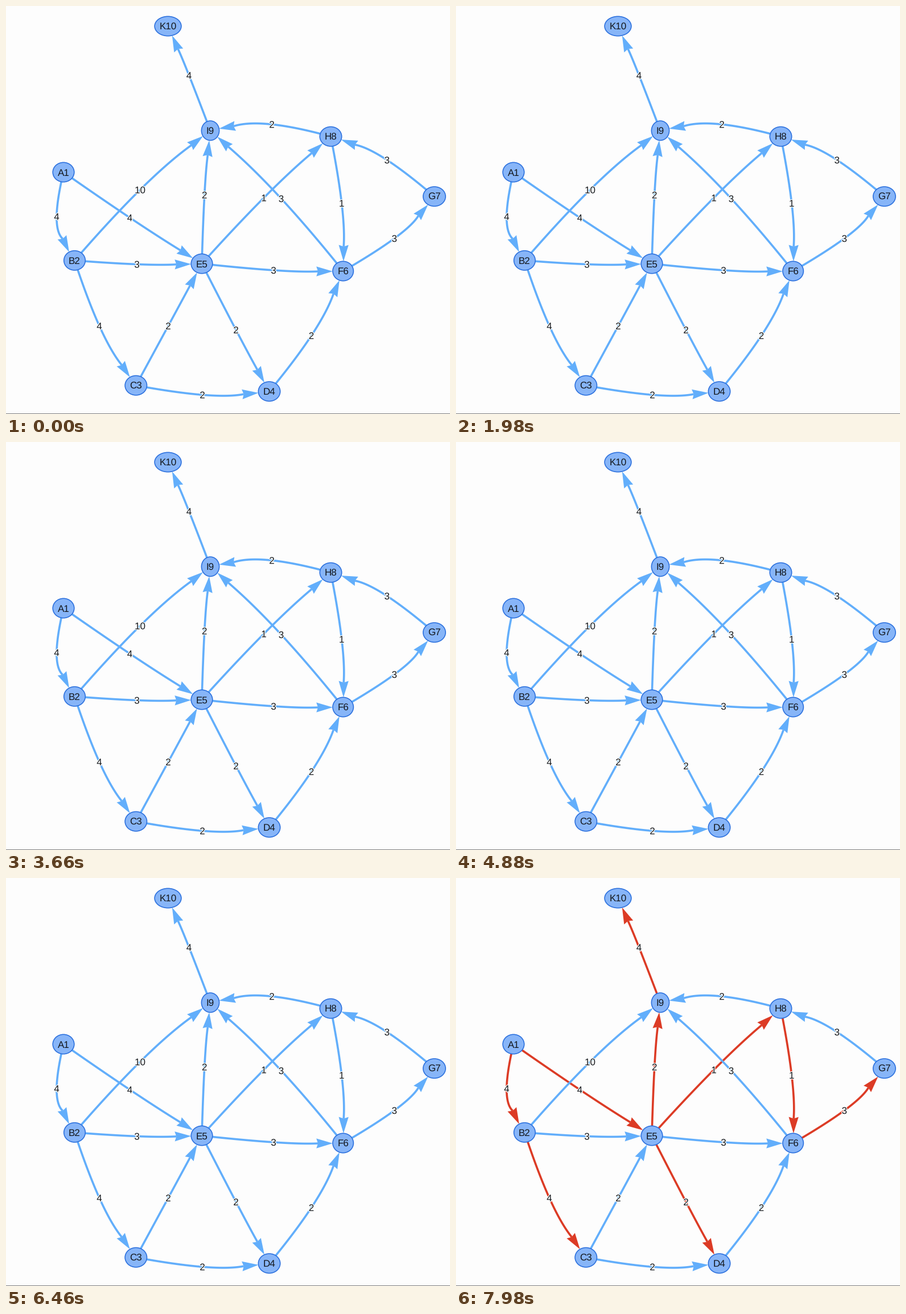
A matplotlib script that plays this animation: 780x718 px, repeating every 8 s.

```python
import numpy as np
import matplotlib.pyplot as plt
from matplotlib.animation import FuncAnimation
from matplotlib.patches import Ellipse, Polygon, Rectangle
from matplotlib.patheffects import withStroke

plt.rcParams["text.hinting"] = "none"

W, H, DPI = 780, 718, 100
PT = 72 / DPI                    # points per pixel
LOOP, STEP, REVEAL = 8000, 80, 6560   # ms

BACK, INK = "#fdfdfd", "#14171b"
FILL, BORDER = "#87b5f8", "#2b70de"
BLUE, RED = "#62aefb", "#dc3b25"
FONT, LINE, ARROW = 17, 3.6, 28.8
RY = 17.2

# name: centre x, centre y, half width
NODES = {
    "A1": (101, 292.5, 18.8), "B2": (120.5, 447.8, 18.8),
    "C3": (228.3, 667.7, 19.2), "D4": (462.5, 678.3, 19.2),
    "E5": (344, 453.5, 18.8), "F6": (592.2, 466.5, 18.2),
    "G7": (752.5, 335.2, 19.7), "H8": (570.5, 229.7, 19.2),
    "I9": (359, 219.3, 15.6), "K10": (284.5, 35.5, 23.4),
}

# start, end, weight, label position (middle of the line), on a shortest path
EDGES = [
    ("A1", "B2", 4, (89, 370.5), True),
    ("A1", "E5", 4, (217.5, 372.5), True),
    ("B2", "C3", 4, (164, 563), True),
    ("B2", "E5", 3, (230, 454.5), False),
    ("B2", "I9", 10, (235.5, 323.5), False),
    ("C3", "D4", 2, (345, 684.3), False),
    ("C3", "E5", 2, (285, 563), False),
    ("D4", "F6", 2, (536.5, 580), False),
    ("E5", "D4", 2, (404, 570), True),
    ("E5", "F6", 3, (470, 465), False),
    ("E5", "H8", 1, (453, 337.5), True),
    ("E5", "I9", 2, (348.7, 332.5), True),
    ("F6", "G7", 3, (682.3, 409), True),
    ("F6", "I9", 3, (483.5, 339), False),
    ("G7", "H8", 3, (669.3, 271), False),
    ("H8", "F6", 1, (589.7, 347), True),
    ("H8", "I9", 2, (467, 208.3), False),
    ("I9", "K10", 4, (321.5, 122), True),
]

fig = plt.figure(figsize=(W / DPI, H / DPI), dpi=DPI, facecolor=BACK)
ax = fig.add_axes([0, 0, 1, 1])
ax.set_xlim(0, W)
ax.set_ylim(H, 0)
ax.axis("off")


def bezier(a, c, b, t):
    t = np.asarray(t, float)[..., None]
    return (1 - t) ** 2 * a + 2 * t * (1 - t) * c + t ** 2 * b


def border_time(a, c, b, rx):
    """Curve parameter at which the edge enters its end node."""
    lo, hi = 0.5, 1.0
    for _ in range(30):
        mid = (lo + hi) / 2
        dx, dy = bezier(a, c, b, mid) - b
        if (dx / rx) ** 2 + (dy / RY) ** 2 > 1:
            lo = mid
        else:
            hi = mid
    return lo


def arrow_tip(a, c, b, rx):
    """Tip and direction of the arrow head at the end node."""
    t = border_time(a, c, b, rx)
    tip = bezier(a, c, b, t)
    d = tip - bezier(a, c, b, t - 0.1)
    return tip, d / np.hypot(*d)


def label(x, y, text, z, **kw):
    ax.text(x, y + 0.355 * FONT, text, ha="center", va="baseline", color=INK,
            family="Liberation Sans", size=FONT * PT, zorder=z, **kw)


def add_edge(start, end, weight, mid):
    a = np.array(NODES[start][:2])
    b = np.array(NODES[end][:2])
    mid = np.array(mid)
    # The line stops inside the arrow head; settle the bend so that
    # its middle falls on the label.
    core = b
    for _ in range(20):
        via = 2 * mid - (a + core) / 2
        tip, d = arrow_tip(a, via, b, NODES[end][2])
        core = tip - 0.9 * ARROW * d
    pts = bezier(a, via, core, np.linspace(0, 1, 60))
    line, = ax.plot(*pts.T, color=BLUE, lw=LINE * PT, zorder=1,
                    solid_capstyle="butt")
    back = tip - ARROW * d
    side = 0.3 * ARROW * np.array([-d[1], d[0]])
    head = Polygon([tip, back + side, core, back - side], fc=BLUE, lw=0,
                   zorder=3)
    ax.add_patch(head)
    label(*mid, str(weight), 2,
          path_effects=[withStroke(linewidth=2.6 * PT, foreground="white")])
    return line, head


path = []
for start, end, weight, mid, shortest in EDGES:
    parts = add_edge(start, end, weight, mid)
    if shortest:
        path.extend(parts)

for name, (x, y, rx) in NODES.items():
    ax.add_patch(Ellipse((x, y), 2 * rx, 2 * RY, fc=FILL, ec=BORDER,
                         lw=1.6 * PT, zorder=4))
    label(x, y, name, 5)

ax.add_patch(Rectangle((0, H - 1), W, 1, fc="#7c7c7c", lw=0, zorder=6))


def draw(i):
    color = RED if i * STEP >= REVEAL else BLUE
    for part in path:
        part.set_color(color)
    return path


anim = FuncAnimation(fig, draw, frames=LOOP // STEP, interval=STEP,
                     init_func=lambda: draw(0), repeat=True, repeat_delay=0,
                     blit=False)
plt.show()
```
